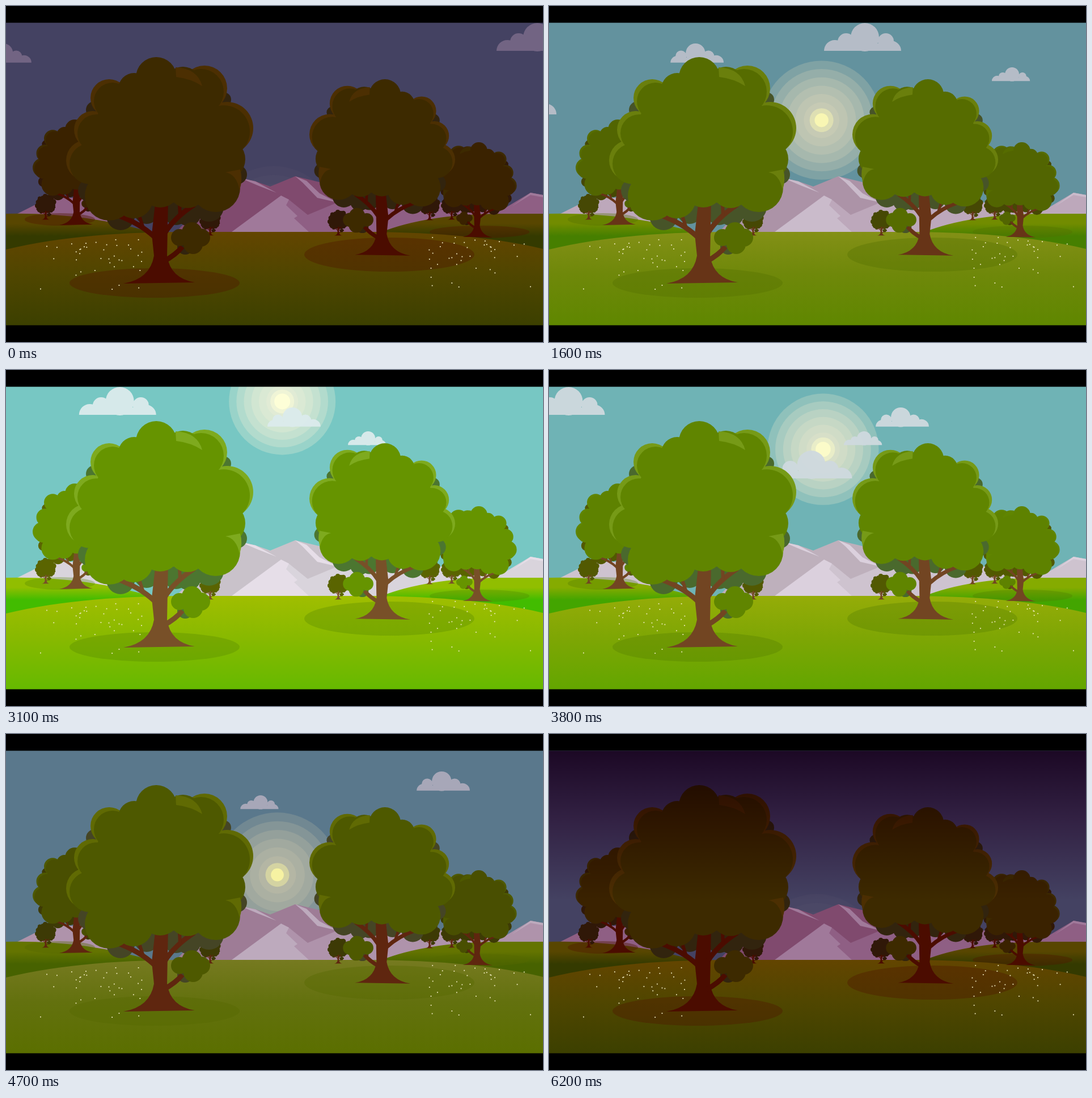
These frames come from a looping animation (947x592 px, 6400 ms). An HTML page with a canvas:

```html
<!DOCTYPE html>
<html lang="en">
<head>
<meta charset="utf-8">
<title>A day in the meadow</title>
<style>
html, body { margin: 0; width: 100%; height: 100%; overflow: hidden; background: #000; }
canvas { display: block; }
</style>
</head>
<body>
<canvas id="stage" width="947" height="592"></canvas>
<script>
const ctx = document.getElementById('stage').getContext('2d');
const LOOP = 6400, STEP = 100, LAST = 6200;
// The sun climbs until half of DAY, then sinks; colours depend on how far it has climbed
const DAY = 5910, DAWN = 1050, NOON = 2425;

// Colours at dusk, dawn and noon
const palette = {
  sky: '444262 566e85 77c7c3',
  cloud: '756785 a4a2b4 dcebec',
  glow: '645a76 d7c8a8 f0f0d6',
  core: '9a8c98 f5f09b fdfed7',
  peakDark: '804a6e 98738f c9c2ca',
  peakMid: '8f5f84 aa8aa5 d9d4dc',
  peakLight: 'a0799a b8a3b7 e6dee8',
  hillTop: '584600 5e6a00 91be00',
  hillLow: '343a00 485600 42bc00',
  grassTop: '634500 707124 a0be00',
  grassMid: '504600 5e6710 88b900',
  grassLow: '3c4000 5a6500 66b900',
  leaf: '3d2a00 4b5100 669400',
  leafLight: '4c2f02 5c6200 7eaa1e',
  leafDark: '32240e 443e23 4c7630',
  farLeaf: '3a2200 454601 669400',
  bush: '301808 393506 5a6400',
  trunk: '4b0c00 5c210c 785028',
  shade: '501900 586300 508200'
};
for (const name in palette)
  palette[name] = palette[name].split(' ').map(h => [0, 2, 4].map(i => parseInt(h.substr(i, 2), 16)));

const lerp = (a, b, k) => a + (b - a) * k;
const clamp01 = v => Math.min(1, Math.max(0, v));

function fill(color, path) {
  ctx.fillStyle = color;
  ctx.fill(typeof path === 'string' ? new Path2D(path) : path);
}

function circles(list, outline) {
  const path = new Path2D(outline);
  for (const [x, y, r] of list) {
    path.moveTo(x + r, y);
    path.arc(x, y, r, 0, 2 * Math.PI);
  }
  return path;
}

function ellipse(color, alpha, x, y, rx, ry = rx) {
  ctx.globalAlpha = alpha;
  ctx.fillStyle = color;
  ctx.beginPath();
  ctx.ellipse(x, y, rx, ry, 0, 0, 2 * Math.PI);
  ctx.fill();
  ctx.globalAlpha = 1;
}

function vertical(y0, y1, ...stops) {
  const g = ctx.createLinearGradient(0, y0, 0, y1);
  stops.forEach(([at, color]) => g.addColorStop(at, color));
  return g;
}

// Lobes of the crown; the lit ones show a rim on their outer upper side
const lit = [[182, 162, 33], [350, 145, 40], [153, 218, 33], [142, 272, 36], [390, 215, 46]];
const plain = [
  [268, 235, 115], [265, 126, 36], [226, 146, 28], [312, 140, 33],
  [182, 335, 43], [225, 340, 34], [272, 320, 35], [320, 322, 34], [370, 320, 43], [385, 270, 37],
  [328, 399, 18], [306, 408, 15], [344, 408, 16], [330, 420, 17]
];
const under = [
  [156, 183, 15], [384, 165, 13], [408, 297, 17], [147, 325, 20],
  [202, 370, 25], [248, 362, 22], [300, 364, 22], [322, 366, 22], [358, 354, 26], [316, 424, 14]
];
const treeShape = {
  dark: circles(under),
  light: circles(lit),
  leaf: circles(plain.concat(lit.map(([x, y, r]) => [x + 6 * Math.sign(265 - x), y + 6, r]))),
  rim: new Path2D('M299,108 Q338,110 346,141 Q326,128 300,125 Z M387,293 Q406,296 412,324 Q418,305 413,288 Z'),
  trunk: new Path2D('M207,489 Q254,481 261,440 L257,402 L264,340 H286 L284,440 Q290,480 333,487 Z'),
  boughs: new Path2D('M262,407 Q235,382 195,368 M280,400 Q298,372 332,350 M278,450 Q300,438 311,424'),
  twigs: new Path2D('M241,388 L231,358 M307,370 L306,348')
};

// x, y: top left corner of the crown
function tree(x, y, scale, flip, leaf, light, dark, trunk) {
  ctx.setTransform(flip ? -scale : scale, 0, 0, scale, flip ? x + 436 * scale : x - 106 * scale, y - 90 * scale);
  fill(dark, treeShape.dark);
  fill(trunk, treeShape.trunk);
  ctx.strokeStyle = trunk;
  ctx.lineWidth = 9;
  ctx.stroke(treeShape.boughs);
  ctx.lineWidth = 6;
  ctx.stroke(treeShape.twigs);
  fill(light, treeShape.light);
  fill(leaf, treeShape.leaf);
  fill(light, treeShape.rim);
  ctx.resetTransform();
}

const cloudShape = circles([[39, 33, 15], [72, 25, 25], [109, 32, 14]],
  'M0,49 A19,19 0 0 1 38,49 Z M98,49 A19,18 0 0 1 136,49 Z M24,49 V36 H112 V49 Z');

function cloud(x, y, scale, flip, color) {
  ctx.setTransform(flip ? -scale : scale, 0, 0, scale, flip ? x + 136 * scale : x, y);
  ctx.globalAlpha = .95;
  fill(color, cloudShape);
  ctx.globalAlpha = 1;
  ctx.resetTransform();
}

// Flowers thin out towards the viewer; the right field mirrors the left
let seed = 7;
const random = () => (seed = seed * 16807 % 2147483647) / 2147483647;
const flowers = Array.from({ length: 40 }, () => [60 + 190 * random(), 410 + 100 * random() ** 1.6]);

function draw(t) {
  const climb = Math.max(0, Math.min(t, DAY - t));
  const phase = climb < DAWN ? climb / DAWN : 1 + clamp01((climb - DAWN) / (NOON - DAWN));
  const part = Math.min(1, Math.floor(phase)), k = phase - part;
  const blend = stops => lerp(stops[part], stops[part + 1], k);
  const c = {};
  for (const name in palette)
    c[name] = `rgb(${[0, 1, 2].map(n => Math.round(blend(palette[name].map(color => color[n]))))})`;

  // Sky, sun and clouds
  ctx.fillStyle = c.sky;
  ctx.fillRect(0, 0, 947, 592);
  const sunX = 472 + .0054 * climb, sunY = 394 - .1205 * climb;
  const halo = blend([112, 112, 94]), strength = blend([.12, .17, .28]);
  for (let ring = 0; ring < 6; ring++) ellipse(c.glow, strength, sunX, sunY, halo * (1 - .14 * ring));
  ellipse(c.core, .5, sunX, sunY, 21);
  ellipse(c.core, 1, sunX, sunY, blend([11, 11, 14]));
  cloud(865 - .2375 * t, 30, 1, false, c.cloud);
  cloud(-49 + .1645 * t, 66, .69, true, c.cloud);
  cloud(970.7 - .1186 * t, 108, .495, false, c.cloud);
  cloud(-502 + .237 * t, 142, 1, true, c.cloud);

  // Mountains
  fill(c.peakMid, 'M18,367 L50,351 L78,338 H200 V398 Z M500,398 L585,345 L640,325 L760,345 L870,362 L925,329 L947,333 V398 Z');
  fill(c.peakDark, 'M300,398 L380,315 L415,303 L440,309 L466,318 L510,300 L560,312 L620,345 L532,372 L560,398 Z');
  fill(c.peakMid, 'M485,334 L500,342 L532,368 L585,346 L640,398 H485 Z');
  fill(c.peakLight, 'M398,398 L485,334 L499,341 L494,351 L514,370 L508,374 L534,398 Z M413,303 L440,309 L477,329 L446,317 Z M510,300 L530,308 L553,330 L584,346 L549,338 L523,311 Z M892,353 L925,329 L947,333 V337 L925,333 Z');

  // Far hills
  const hill = vertical(366, 415, [.35, c.hillTop], [.8, c.hillLow]);
  const shadow = (...box) => ellipse(c.shade, blend([.42, .4, .3]), ...box);
  fill(hill, 'M0,366 Q140,363 260,400 V435 H0 Z M660,399 Q740,367 870,366 H947 V435 H660 Z');
  shadow(95, 376, 62, 11);
  shadow(835, 398, 88, 11);

  // Meadow
  fill(vertical(398, 562, [0, c.grassTop], [.45, c.grassMid], [1, c.grassLow]),
    'M0,429 C100,405 210,398 330,398 H620 C740,398 850,405 947,428 V570 H0 Z');
  shadow(262, 488, 150, 26);
  shadow(676, 438, 150, 30);
  ctx.fillStyle = '#f0ebc0';
  for (const [x, y] of flowers) {
    ctx.fillRect(x, y, 1.8, 1.8);
    ctx.fillRect(984 - x, y - 4, 1.8, 1.8);
  }

  // Trees, from far to near
  for (const [x, y] of [[51, 331], [341, 359], [567, 359], [728, 332], [767, 331]])
    tree(x, y, .114, false, c.bush, c.bush, c.bush, c.trunk);
  tree(47, 200, .466, false, c.farLeaf, c.leaf, c.bush, c.trunk);
  tree(762, 240, .42, true, c.farLeaf, c.leaf, c.bush, c.trunk);
  tree(106, 90, 1, false, c.leaf, c.leafLight, c.leafDark, c.trunk);
  tree(535, 129, .779, true, c.leaf, c.leafLight, c.leafDark, c.trunk);

  // Night falling from above
  ctx.globalAlpha = clamp01((t - 5700) / 500);
  ctx.globalCompositeOperation = 'multiply';
  ctx.fillStyle = vertical(30, 293, [0, '#692060'], [.46, '#bc80af'], [1, '#fff']);
  ctx.fillRect(0, 30, 947, 263);
  ctx.globalCompositeOperation = 'source-over';
  ctx.globalAlpha = 1;

  ctx.fillStyle = '#000';
  ctx.fillRect(0, 0, 947, 29.5);
  ctx.fillRect(0, 562.5, 947, 30);
}

const start = performance.now();
function frame() {
  const t = (performance.now() - start) % LOOP;
  draw(Math.min(LAST, Math.floor(t / STEP) * STEP));
  requestAnimationFrame(frame);
}
frame();
</script>
</body>
</html>
```
